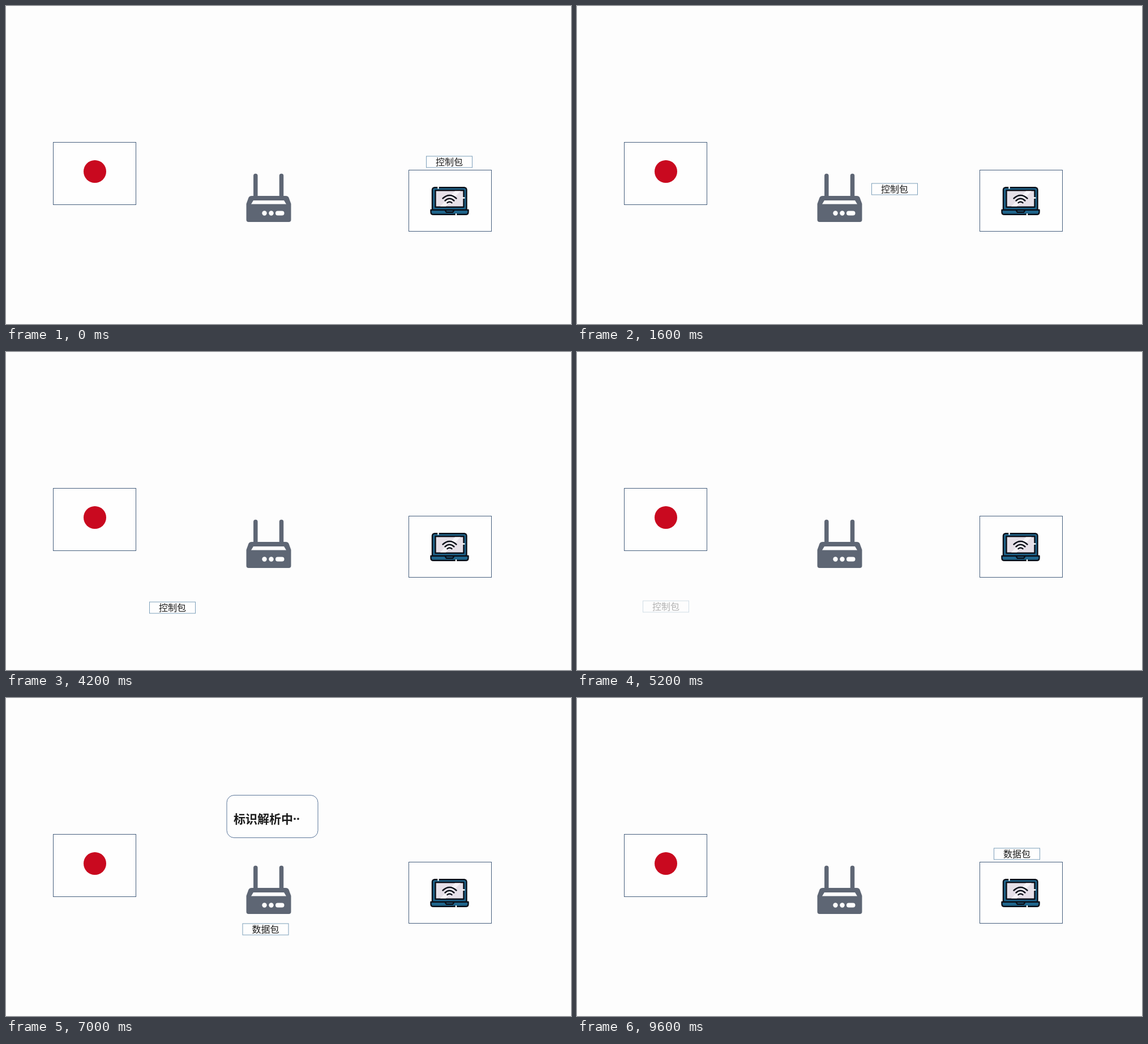
An HTML page that plays this animation: 998 px wide and 561 px high, repeating every 9.8 s.

```html
<!DOCTYPE html>
<html lang="zh-CN">
<head>
<meta charset="utf-8">
<style>
html, body { margin: 0; width: 100%; height: 100%; overflow: hidden; background: #fdfdfd; }
svg { display: block; }
text { font-family: "Noto Sans CJK SC", "Noto Sans CJK", sans-serif; fill: #1c1c1c; }
.dots { font-family: "Open Sans", sans-serif; }
.frame { fill: #fefefe; stroke: #465f7e; }
</style>
</head>
<body>
<svg width="998" height="561" viewBox="0 0 998 561">
  <rect class="frame" x="83.5" y="240.5" width="146" height="110"/>
  <circle cx="157" cy="292" r="20" fill="#c9091f"/>

  <!-- router -->
  <g fill="#5e6674">
    <path d="M440.8 299.500V338M486.500 299.500V338" stroke="#5e6674" stroke-width="7.500" stroke-linecap="round"/>
    <path d="M434 335H494Q498 335 499.500 338L503.500 349V377Q503.500 381 499.500 381H428.500Q424.500 381 424.500 377V349L428.500 338Q430 335 434 335Z"/>
    <g fill="#fdfdfd">
      <path d="M437 343H491L495 349.500H433Z"/>
      <circle cx="456.500" cy="365.500" r="4.200"/>
      <circle cx="468.500" cy="365.500" r="4.200"/>
      <rect x="476" y="361.500" width="15.500" height="8" rx="4"/>
    </g>
  </g>

  <rect class="frame" x="711.5" y="289.5" width="146" height="108"/>
  <!-- laptop -->
  <g fill="#1f658c" stroke="#0b0f18" stroke-width="2.400" stroke-linecap="round" stroke-linejoin="round">
    <rect x="753" y="320.200" width="60.500" height="41" rx="4"/>
    <rect x="758.500" y="325.200" width="50" height="29.500" fill="#e6e0e8"/>
    <path d="M767 353.500L793 326.500H803L777 353.500Z" fill="#f7f4f8" stroke="none"/>
    <path d="M750.500 359.700H816.500V363.500Q816.500 367.800 812 367.800H755Q750.500 367.800 750.500 363.500Z"/>
    <path d="M775.500 360L778 363.800H789L791.500 360" fill="none"/>
    <path d="M771.500 339.500Q783.500 328.500 795.500 339.500M775.500 343.500Q783.500 336 791.500 343.500M779.500 347.200Q783.500 343.800 787.500 347.200" fill="none"/>
    <path d="M763.500 319V321.500M807 338.500H809.500M795 367V368.500" stroke="#fefefe"/>
  </g>

  <g id="bubble">
    <rect x="390" y="171.500" width="161" height="75" rx="13" fill="#fefefe" stroke="#5b769a"/>
    <text x="402" y="220.500" font-size="21" font-weight="700">标识解析中<tspan id="dots" class="dots"></tspan></text>
  </g>
  <g id="packet">
    <rect x="-40.500" y="-10" width="81" height="20" fill="#fefefe" stroke="#7c9fba"/>
    <text id="label" y="6" font-size="16" text-anchor="middle"></text>
  </g>
</svg>
<script>
const LOOP = 9800, STEP = 200;
const $ = id => document.getElementById(id);

// Each trip holds its last position until the next one begins.
const trips = [
  { from: 0, to: 2200, label: "控制包", path: [[783, 274.5], [679, 80], [587, 341], [470.5, 408]] },
  { from: 3400, to: 4800, label: "控制包", path: [[470.5, 408], [392, 471], [322, 374], [235, 531], [157, 449]] },
  { from: 5800, to: 6400, label: "数据包", path: [[178, 460], [412, 414], [458.5, 408]] },
  { from: 8200, to: 9600, label: "数据包", path: [[458.5, 408], [575, 341], [673, 110], [777, 274.5]] }
];
const waits = [2400, 6800];
const clamp = v => Math.max(0, Math.min(1, v));

// Point on a Bezier curve of any degree.
function bezier(points, s) {
  while (points.length > 1)
    points = points.slice(1).map((p, i) => p.map((v, k) => points[i][k] + (v - points[i][k]) * s));
  return points[0];
}

function draw(t) {
  const trip = trips.filter(p => p.from <= t).pop();
  const [x, y] = bezier(trip.path, clamp((t - trip.from) / (trip.to - trip.from)));
  $("packet").setAttribute("transform", `translate(${Math.round(x * 2) / 2} ${Math.round(y)})`);
  $("packet").setAttribute("opacity", t > 4800 && t < 5800 ? clamp((5400 - t) / 600) : 1);
  $("label").textContent = trip.label;

  const wait = waits.find(w => t >= w && t < w + 6 * STEP);
  $("bubble").setAttribute("visibility", wait ? "visible" : "hidden");
  $("dots").textContent = wait ? "·".repeat((t - wait) / STEP + 1) : "";
}

function tick() {
  const t = performance.now() % LOOP;
  draw(Math.floor(t / STEP) * STEP);
  requestAnimationFrame(tick);
}
tick();
</script>
</body>
</html>
```
